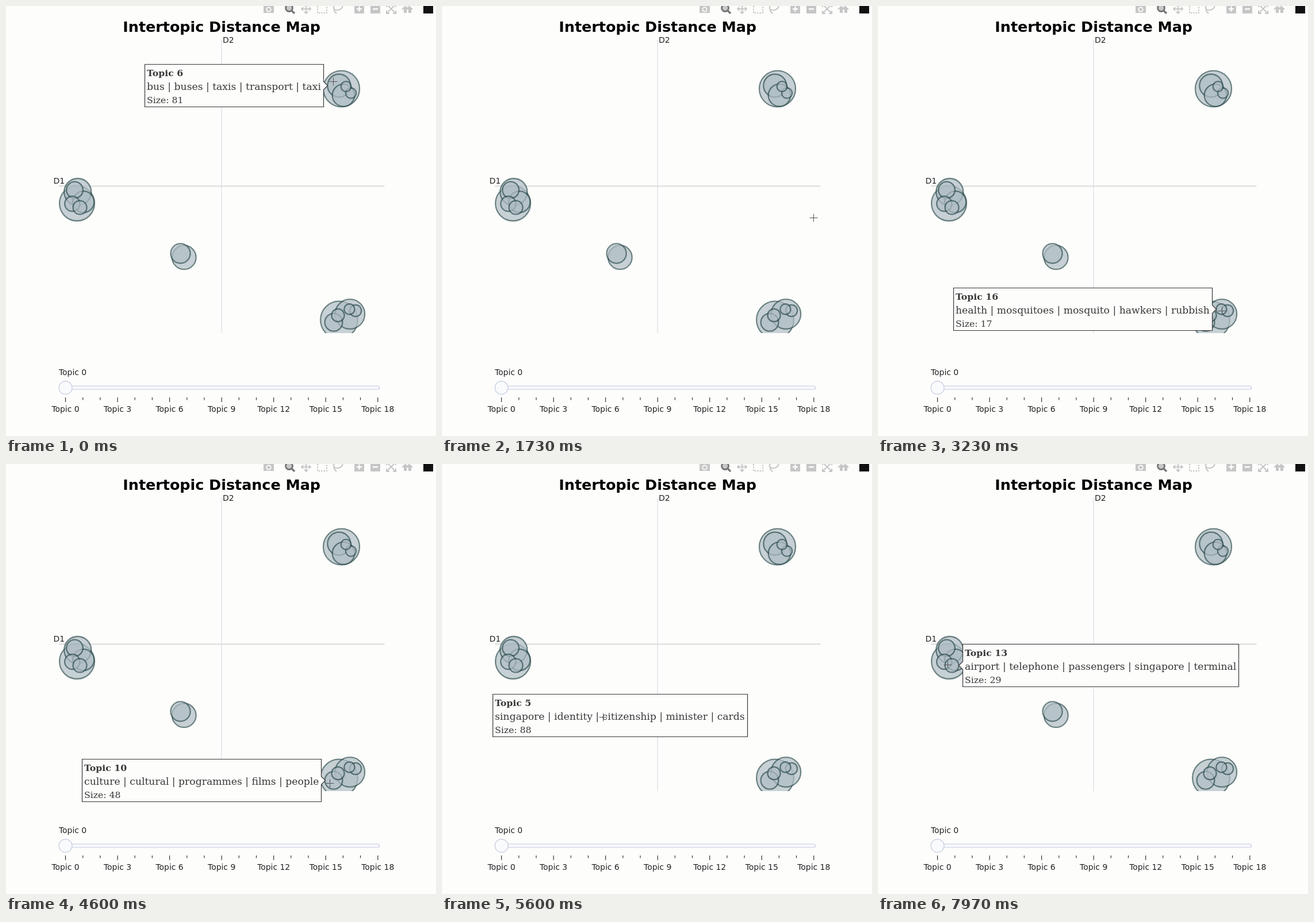
An HTML page with a canvas that plays this animation: 748x748 px, repeating every 8 s.

```html
<!DOCTYPE html>
<html lang="en">
<head>
<meta charset="utf-8">
<title>Intertopic Distance Map</title>
<style>
  html, body { margin: 0; width: 100%; height: 100%; overflow: hidden; background: #fdfdfc; }
  canvas { display: block; }
</style>
</head>
<body>
<canvas id="stage" width="748" height="748"></canvas>
<script>
const LOOP = 8000;
const HOVER_DELAY = 150;
const SANS = '"DejaVu Sans", sans-serif';
const SERIF = '"DejaVu Serif", serif';
const LABEL = `13.9px ${SANS}`;
const BG = '#fdfdfc';
const INK = '#383838';
const ctx = document.getElementById('stage').getContext('2d');

const linear = u => u;
const smooth = u => u * u * (3 - 2 * u);

// Values at t between key points [t, ...values].
function along(keys, t, ease) {
  const n = keys.findIndex(key => key[0] > t);
  if (n < 0) return keys[keys.length - 1].slice(1);
  if (n === 0) return keys[0].slice(1);
  const [t0, ...a] = keys[n - 1], [t1, ...b] = keys[n];
  const e = ease((t - t0) / (t1 - t0));
  return a.map((v, i) => v + (b[i] - v) * e);
}

// Topic sizes fall with the topic number; bubble area follows size.
const sizeKeys = [[0, 213], [2, 188], [3, 135], [5, 88], [6, 81], [8, 70], [10, 48], [13, 29], [16, 17], [18, 16]];

const centres = [
  [579.5, 546], [583.5, 144], [123.5, 343.3], [598.3, 536], [124.7, 323.5],
  [309.7, 437.3], [579.3, 138.5], [587, 155.3], [134.7, 340.7], [303.5, 430.5],
  [570, 550.3], [119.5, 320], [115.3, 344], [128.5, 350.5], [577.5, 538],
  [608, 530], [597.4, 527.4], [600, 151.5], [591.5, 140]
];

const words = {
  5: 'singapore | identity | citizenship | minister | cards',
  6: 'bus | buses | taxis | transport | taxi',
  9: 'education | students | schools | university | teachers',
  10: 'culture | cultural | programmes | films | people',
  13: 'airport | telephone | passengers | singapore | terminal',
  16: 'health | mosquitoes | mosquito | hawkers | rubbish'
};

const topics = centres.map(([x, y], id) => {
  const size = Math.round(along(sizeKeys, id, linear)[0]);
  return { id, x, y, size, r: 2.22 * Math.sqrt(size), words: words[id] };
});

// time, x, y of the pointer
const route = [
  [0, 569, 131], [1730, 646, 368], [2900, 598, 530], [3770, 598, 530], [4600, 563, 555],
  [5300, 312, 455], [5600, 280, 440], [5800, 297, 430], [6300, 297, 430],
  [6630, 145, 372], [7400, 121, 349]
];

function text(str, x, y, font, color = '#222', align = 'left') {
  ctx.font = font;
  ctx.fillStyle = color;
  ctx.textAlign = align;
  ctx.fillText(str, x, y);
}

function line(color, width, ...pts) {
  ctx.beginPath();
  pts.forEach(([x, y]) => ctx.lineTo(x, y));
  ctx.strokeStyle = color;
  ctx.lineWidth = width;
  ctx.stroke();
}

function disc(x, y, r, fill) {
  ctx.beginPath();
  ctx.arc(x, y, r, 0, Math.PI * 2);
  ctx.fillStyle = fill;
  ctx.fill();
}

function ring(x, y, r, color, width) {
  ctx.beginPath();
  ctx.arc(x, y, r, 0, Math.PI * 2);
  ctx.strokeStyle = color;
  ctx.lineWidth = width;
  ctx.stroke();
}

function rect(x, y, w, h, fill) {
  ctx.fillStyle = fill;
  ctx.fillRect(x, y, w, h);
}

// Four copies of a drawing, a quarter turn apart around (x, y).
function quarters(x, y, part) {
  for (let i = 0; i < 4; i++) {
    ctx.save();
    ctx.translate(x, y);
    ctx.rotate(i * Math.PI / 2);
    part();
    ctx.restore();
  }
}

function toolbar() {
  const grey = '#c6c6c6';
  // camera
  rect(448, 0, 18, 12, grey);
  disc(457, 6, 4.6, BG);
  disc(457, 6, 2.8, grey);
  // magnifier
  disc(492.5, 3.5, 6, '#c8c8c8');
  ring(492.5, 3.5, 6, '#757575', 2.8);
  line('#757575', 3.2, [497, 8], [502, 13]);
  // pan
  quarters(522, 5, () => {
    line(grey, 1.8, [0, 0], [7, 0]);
    line(grey, 1.8, [5, -3], [8, 0], [5, 3]);
  });
  // box select
  ctx.setLineDash([2.5, 2]);
  line(grey, 2, [542, 0], [542, 12], [558, 12], [558, 0]);
  ctx.setLineDash([]);
  // lasso
  ctx.beginPath();
  ctx.ellipse(577.5, 2, 8, 5, -0.25, 0, Math.PI * 2);
  ctx.stroke();
  line(grey, 2, [571, 5], [571, 9], [575, 13]);
  // zoom in and out
  for (const x of [606, 634]) {
    rect(x, 0, 17, 13, grey);
    rect(x + 4, 4, 9, 2.4, BG);
  }
  rect(613.3, 0.7, 2.4, 9, BG);
  // autoscale
  quarters(670, 5, () => {
    line(grey, 2, [0, 0], [7, 7]);
    line(grey, 2, [3, 8], [8, 8], [8, 3]);
  });
  // home
  line(grey, 2, [689, 6], [698, -2], [707, 6]);
  rect(692, 2, 13, 4, grey);
  rect(692, 4, 5, 8, grey);
  rect(700, 4, 5, 8, grey);
  rect(726, -4, 17, 17, '#111');
}

function chart() {
  text('Intertopic Distance Map', 375.2, 45, `bold 25.4px ${SANS}`, '#000', 'center');
  line('#e9e9ee', 2, [375, 59], [375, 569]);
  line('#dddfdf', 2.3, [92, 313.4], [658.5, 313.4]);
  text('D1', 82.5, 308.5, LABEL);
  text('D2', 377, 64, LABEL);

  ctx.save();
  ctx.beginPath();
  ctx.rect(92, 59, 567, 510);
  ctx.clip();
  ctx.globalAlpha = 0.7;
  for (const { x, y, r } of topics) {
    disc(x, y, r - 1.1, '#b0bec5');
    ring(x, y, r, '#2f4f4f', 2.3);
  }
  ctx.restore();
}

function slider() {
  text('Topic 0', 92, 642, LABEL);
  ctx.beginPath();
  ctx.roundRect(92.5, 661, 557, 6, 3);
  ctx.fillStyle = '#f8f8fd';
  ctx.fill();
  ctx.strokeStyle = '#c9cbe3';
  ctx.lineWidth = 1.2;
  ctx.stroke();
  disc(103.5, 664, 11.4, '#f9fafc');
  ring(103.5, 664, 11.4, '#c3c9de', 1.2);
  for (const { id } of topics) {
    const x = 103.5 + id * 30.18;
    const major = id % 3 === 0;
    line('#333', 1.2, [x, 681], [x, major ? 689 : 685.5]);
    if (major) text('Topic ' + id, x, 706, LABEL, '#222', 'center');
  }
}

function tooltip({ id, x: cx, y: cy, r, size, words }) {
  const tip = 7, half = 37;
  ctx.font = `17.2px ${SERIF}`;
  const w = Math.round(ctx.measureText(words).width) + 8;
  const reach = r + tip;
  // right of the bubble if it fits, else left, else centred
  const side = cx + reach + w < 748 ? 1 : cx - reach - w > 0 ? -1 : 0;
  const start = side > 0 ? cx + reach : side < 0 ? cx - reach - w : cx - w / 2;
  const left = Math.round(start) + 0.5, right = left + w;
  const mid = Math.floor(cy) + 0.5, top = mid - half, bottom = mid + half;
  const notch = (x, dir) => [[x, mid - dir * tip], [x + dir * tip, mid], [x, mid + dir * tip]];

  const outline = [[left, top], [right, top]];
  if (side < 0) outline.push(...notch(right, 1));
  outline.push([right, bottom], [left, bottom]);
  if (side > 0) outline.push(...notch(left, -1));
  ctx.beginPath();
  outline.forEach(([x, y]) => ctx.lineTo(x, y));
  ctx.closePath();
  ctx.fillStyle = BG;
  ctx.fill();
  ctx.strokeStyle = INK;
  ctx.lineWidth = 1.2;
  ctx.stroke();

  const x = left + 3.5;
  text('Topic ' + id, x, mid - 16.5, `bold 15.7px ${SERIF}`, INK);
  text(words, x, mid + 7, `17.2px ${SERIF}`, INK);
  text('Size: ' + size, x, mid + 30, `15.7px ${SERIF}`, INK);
}

// The smallest labelled bubble under the pointer, which is the last in order.
function hovered(t) {
  const [x, y] = along(route, t - HOVER_DELAY, smooth);
  return topics.filter(p => p.words && Math.hypot(x - p.x, y - p.y) < p.r).pop();
}

function pointer(t) {
  const [x, y] = along(route, t, smooth).map(v => Math.round(v) + 0.5);
  line('#555', 1, [x - 7, y], [x + 7, y]);
  line('#555', 1, [x, y - 7], [x, y + 7]);
}

function draw(t) {
  rect(0, 0, 748, 748, BG);
  toolbar();
  chart();
  slider();
  const topic = hovered(t);
  if (topic) tooltip(topic);
  pointer(t);
}

const start = performance.now();
function tick() {
  draw((performance.now() - start) % LOOP);
  requestAnimationFrame(tick);
}
tick();
</script>
</body>
</html>
```
